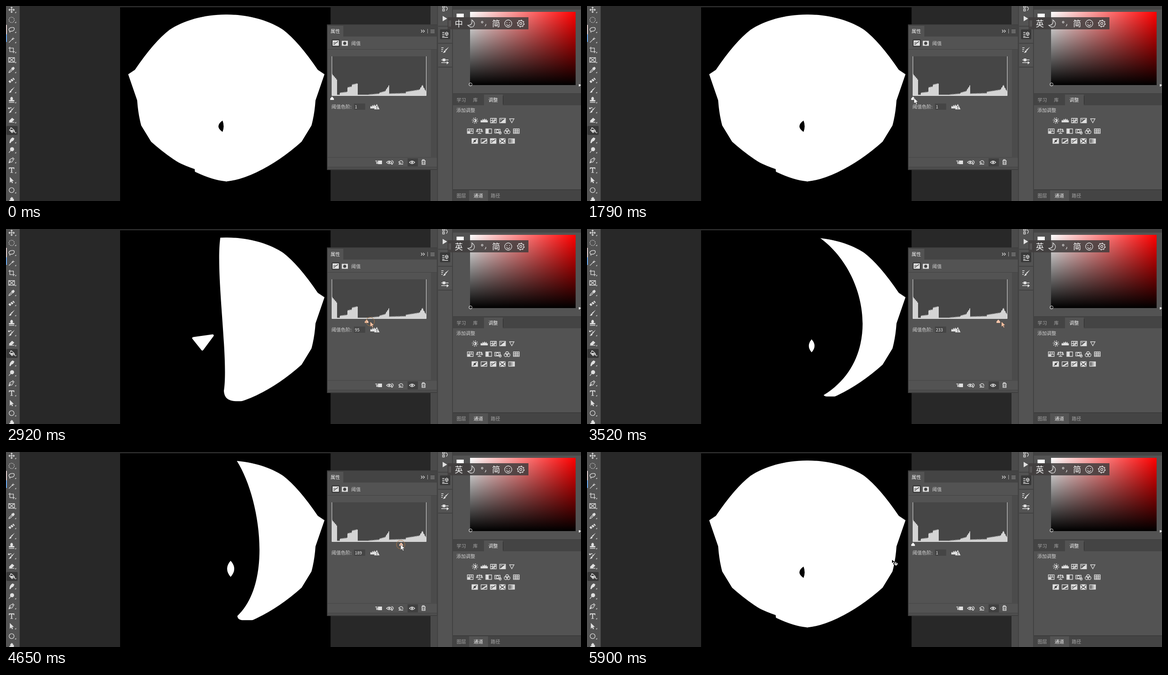
An HTML page that plays this animation: 1280x434 px, repeating every 6760 ms.

```html
<!DOCTYPE html>
<html lang="zh-CN">
<head>
<meta charset="utf-8">
<title>阈值</title>
<style>
  html, body { margin: 0; width: 100%; height: 100%; overflow: hidden; background: #282828; }
  svg { display: block; width: 100vw; height: 100vh; }
  text { font-family: "Noto Sans CJK SC", "Noto Sans CJK", "Noto Sans", sans-serif; font-size: 10.5px; fill: #d0d0d0; }
  .dim { fill: #a5a5a5; }
  .on { fill: #f2f2f2; }
  .ime { font-size: 18px; fill: #f4f4f4; text-anchor: middle; }
  .line { fill: none; stroke: #e0e0e0; stroke-width: 1.3; }
  .solid { fill: #e0e0e0; stroke: none; }
  .cut { fill: none; stroke: #484848; stroke-width: 1.4; }
</style>
</head>
<body>
<svg viewBox="0 0 1280 434" preserveAspectRatio="none">
  <defs>
    <linearGradient id="hue"><stop stop-color="#fff"/><stop offset="1" stop-color="#f00"/></linearGradient>
    <linearGradient id="shade" x2="0" y2="1"><stop stop-color="#000" stop-opacity="0"/><stop offset="1"/></linearGradient>
    <linearGradient id="ramp"><stop stop-color="#555"/><stop offset="1" stop-color="#eee"/></linearGradient>
    <clipPath id="face">
      <path id="half" d="M489 19H490C540 19 585 32 617 53Q652 80 694 142L709 152L689 210Q687 240 680 266L658 302Q610 345 558 370Q520 388 490 390.500H489z"/>
      <use href="#half" transform="matrix(-1 0 0 1 981 0)"/>
    </clipPath>
    <path id="bars" class="solid" d="M-8 4V0l2-2 1 3 2-5 2 3 2-4 2 4 2-3 1 4 2-1v5z"/>
    <g id="eye"><path class="line" d="M-6 0Q0-6 6 0Q0 6-6 0z"/><circle class="solid" r="2"/></g>
  </defs>

  <rect width="1280" height="434" fill="#282828"/>
  <rect x="254" y="3" width="468.500" height="431"/>

  <g clip-path="url(#face)"><path id="lit" fill="#fff"/></g>
  <path id="nose"/>
  <path id="cheek" fill="#fff" stroke="#fff" stroke-width="5" stroke-linejoin="round" d="M417 243L460 237L437 268z"/>
  <path id="glint" fill="#fff"/>

  <!-- tool column -->
  <rect width="30" height="434" fill="#535353"/>
  <path d="M30.500 0V434" stroke="#3a3a3a"/>
  <path d="M1 42V63" stroke="#dccaca" stroke-width="2"/>
  <path d="M1 63V80" stroke="#6aaaf0" stroke-width="2"/>
  <rect x="1" y="267" width="25" height="20" rx="2" fill="#383838"/>
  <g id="tools"></g>

  <!-- dock -->
  <rect x="945" width="335" height="434" fill="#535353"/>
  <rect x="945" width="15" height="434" fill="#4b4b4b"/>
  <path d="M960.500 0V434M994 0V434M962 45H993M962 83H993M962 136H993" stroke="#424242" stroke-width="2"/>
  <rect x="966" y="52" width="23" height="22" rx="2" fill="#393939"/>
  <g id="dock"></g>

  <!-- colour panel -->
  <rect x="995" width="285" height="8" fill="#444"/>
  <rect x="1003" y="17" width="16" height="8" fill="#fff"/>
  <rect x="1033" y="13" width="235" height="163" fill="url(#hue)"/>
  <rect x="1033" y="13" width="235" height="163" fill="url(#shade)"/>
  <circle cx="1034" cy="174.500" r="3.500" fill="none" stroke="#e8e8e8"/>
  <path class="solid" d="M1275 174h2l3 2-3 3h-2z"/>

  <!-- adjustments and layer tabs -->
  <path d="M995 195.500H1280M995 409H1280" stroke="#3c3c3c" stroke-width="2"/>
  <path d="M995 197H1280V221H995zM995 410H1280V434H995z" fill="#444"/>
  <path d="M1064 197H1106V222H1064zM1031 410H1073V434H1031z" fill="#535353"/>
  <path d="M1106.500 200V219" stroke="#2c2c2c"/>
  <text class="dim" x="1003" y="212.500">学习</text><text class="dim" x="1039.500" y="212.500">库</text><text class="on" x="1074" y="212.500">调整</text>
  <text x="1002.500" y="236">添加调整</text>
  <text class="dim" x="1003" y="426">图层</text><text class="on" x="1041" y="426">通道</text><text class="dim" x="1079" y="426">路径</text>
  <g id="adjust"></g>

  <!-- input method bar -->
  <rect x="983" y="25" width="180" height="27" fill="#403d3d" fill-opacity=".86"/>
  <path d="M986.500 32V46M989.500 32V46" stroke="#777"/>
  <text class="ime" id="lang" x="1008" y="46"></text>
  <path class="line" d="M1037 31Q1047 38 1040 46Q1034 49 1028 43Q1039 43 1037 31z"/>
  <circle class="line" cx="1060" cy="36" r="1.800"/><path class="line" d="M1068 40q1 3-2 5"/>
  <text class="ime" x="1091" y="46">简</text>
  <g class="line" transform="translate(1118 39)"><circle r="8"/><path d="M-4 2Q0 7 4 2M-3-3v2M3-3v2"/></g>
  <g class="line" transform="translate(1146 39)"><circle r="6.500"/><circle r="2.500"/><circle r="7.800" pathLength="16" stroke-dasharray="1"/></g>

  <!-- properties panel -->
  <rect x="714.500" y="41" width="246" height="324" fill="#404040"/>
  <rect x="716" y="43" width="243" height="25" fill="#444"/>
  <path d="M716 44H751V69H716zM716 68H959V358H716z" fill="#535353"/>
  <rect x="946" y="97" width="13" height="239" fill="#4b4b4b"/>
  <path d="M716 96.500H959M716 337H959" stroke="#444"/>
  <rect x="716" y="359" width="243" height="4" fill="#4e4e4e"/>
  <text class="on" x="722.500" y="59.500">属性</text>
  <path class="line" d="M924 53l3 3-3 3M928.500 53l3 3-3 3"/>
  <path d="M938.500 51V61M945 53.500h9M945 56.500h9M945 59.500h9" stroke="#aaa"/>
  <rect x="725" y="74" width="18" height="17" rx="2" fill="#383838"/>
  <rect class="solid" x="747.500" y="77.500" width="13.500" height="11"/><circle cx="754" cy="83" r="3.500" fill="#444"/>
  <text x="768.500" y="86.500">阈值</text>

  <rect x="725" y="112" width="210" height="87" fill="#464646"/>
  <path id="histogram" fill="#d4d4d4"/>
  <path d="M725.500 112V199.500H935.500V112" fill="none" stroke="#dedede"/>
  <path id="slider" d="M0-5L4.500 0V3.500H-4.500V0z" stroke="#444" stroke-width=".7"/>
  <text x="724.500" y="227.500">阈值色阶:</text>
  <rect x="774.500" y="217" width="25" height="14" fill="#454545"/>
  <text class="on" id="value" x="776.500" y="228" style="font-size:9.500px"></text>
  <use href="#bars" x="819" y="224"/>
  <path class="solid" d="M825.500 218l6 12h-12z"/><path class="cut" d="M825.500 222v4M825.500 227v2"/>
  <rect x="894" y="339" width="23" height="18" fill="#404040"/>
  <g id="actions"></g>

  <!-- pointers -->
  <circle id="ring" r="9.500" fill="none" stroke="#b07a45"/>
  <path id="resize" d="M-8 0l4-4v2.500h8V-4l4 4-4 4V1.500h-8V4z" fill="#fff" stroke="#222" stroke-width=".8"/>
  <path id="arrow" d="M0 0V12L3 9.500 5 14 7 13 5 8.500H9z" stroke="#333" stroke-width=".6"/>
  <g id="bucket"><path d="M-8-8v7l5-3z"/><path d="M-5 1L0-5 6 1 1 6zM-3 1V-3Q0-8 1-3V1M6 1v5" fill="#ddd" stroke="#111" stroke-width="1.300"/></g>
</svg>

<script>
const LOOP = 6760, STEP = 66.4;
const $ = id => document.getElementById(id);
const clamp = (v, lo, hi) => Math.min(hi, Math.max(lo, v));
const mix = (a, b, f) => Array.isArray(a) ? a.map((v, i) => mix(v, b[i], f)) : a + (b - a) * f;

// keys: [position, value] pairs, value a number or a list
function track(keys, at) {
  const next = keys.findIndex(([p]) => p >= at);
  if (next < 0) return keys[keys.length - 1][1];
  if (!next) return keys[0][1];
  const [p, a] = keys[next - 1], [q, b] = keys[next];
  return mix(a, b, (at - p) / (q - p));
}

// icons
const line = d => `<path class="line" d="${d}"/>`;
const solid = d => `<path class="solid" d="${d}"/>`;
const cut = d => `<path class="cut" d="${d}"/>`;
const ring = (r, x = 0, y = 0) => `<circle class="line" r="${r}" cx="${x}" cy="${y}"/>`;
const dashed = (r, n) => `<circle class="line" r="${r}" pathLength="${2 * n}" stroke-dasharray="1"/>`;
const use = id => `<use href="#${id}"/>`;
const place = (icon, x, y) => `<g transform="translate(${x} ${y})">${icon}</g>`;
const spread = (icons, x, y, dx, dy) => icons.map((icon, i) => place(icon, x + i * dx, y + i * dy)).join('');

const frame = line('M-6.5-5h13v10h-13z');
const block = solid('M-7-6H7V6H-7z');
const threshold = block + cut('M-5 3l3-1 2-3h2l3-3M-5 0l3-2');
const brush = solid('M7-7L0 2-2 0zM-2 1l2 2Q-2 7-7 6Q-4 5-4 2z');
const can = line('M-5 0L0-5 6 1 1 6zM-2-3V-6') + solid('M-4 0H5L1 5zM6 1q3 4 0 5q-2-1 0-5z');
const marker = solid('M10 4v3h-3z');

$('tools').innerHTML = spread([
  line('M-6 0H6M0-6V6') + solid('M-7 0l3-3v6zM7 0l-3-3v6zM0-7l3 3h-6zM0 7l3-3h-6z'),
  dashed(6, 10),
  line('M-4 3Q-9-2-2-5Q7-7 6-1Q4 4-3 3q-3 1 0 3'),
  line('M-6 6L1-1') + solid('M0-2l2 2 2-2-2-2zM3-7l1 3 3 1-3 1-1 3V-3z'),
  line('M-7-4H4V7M-4-7V4H7'),
  frame + line('M-6-5L6 5M6-5L-6 5'),
  line('M-6 6l1-3 5-5 2 2-5 5z') + solid('M-1-4l5 5 3-5-3-3z'),
  solid('M-7 3L4-5l3 4L-4 7z') + cut('M-3 0l4 5M1-3l4 4'),
  brush,
  solid('M-2-6Q0-8 2-6Q4-3 2 0H6V3H-6V0H-2Q-4-3-2-6zM-6 4.500H6V6H-6z'),
  brush + line('M-7-3q4-4 7-1M-7-6v3h3'),
  solid('M-6 2L1-5 6-1 0 5H-4z') + line('M-6 5H6'),
  can,
  solid('M-5 6Q-4-3 2-6L6-4Q5 2 0 3L-3 7z'),
  '<circle class="solid" cx="1" cy="-2" r="4.500"/>' + line('M-2 1L-6 6'),
  line('M-6 6l2-7 5-3 3 3-3 5zM-6 6l5-5M2-6l4 4'),
  solid('M-6-6H6V-2H5L4-4H1V5H3V6H-3V5H-1V-4H-4L-5-2H-6z'),
  solid('M-4-7L5 2H1L3 6 1 7-1 3-4 6z'),
  ring(5.5),
  solid('M-5 4V-1l2 1v-5h2v4-6h2v6-5h2v6-3h2V5z')
].map(icon => icon + marker), 12.5, 8.5, 0, 22.3);

$('adjust').innerHTML = spread([
  ring(3) + dashed(6, 8) + solid('M0-3a3 3 0 0 1 0 6z'),
  use('bars'),
  frame + line('M-2-5V5M2-5V5M-6 0H6M-5 5Q2 3 6-5'),
  frame + solid('M-6 5L6-5V5z') + line('M-5-2h4'),
  line('M-5-4H5L0 5z')
], 1044, 255, 20.5, 0) + spread([
  frame + line('M-6 0H6M-2-5V0M2-5V0') + solid('M-6 1H0V5H-6z'),
  line('M0-6V5M-5-4H5M-4 5H4M-5-4l-2 5h4zM5-4l-2 5h4z'),
  frame + solid('M-6-5H0V5H-6z'),
  ring(3, -1) + ring(2.5, 5, 4) + line('M-7-4H5V4H-7z'),
  ring(3.5, 0, -2) + ring(3.5, -3, 2) + ring(3.5, 3, 2),
  frame + line('M-2-5V5M2-5V5M-6-1.500H6M-6 2H6')
], 1033.5, 278.5, 20.5, 0) + spread([
  block + cut('M-4 4L4-4') + '<circle r="2.500" fill="#484848"/>',
  frame + solid('M-6 4L6-4V0L-3 5z'),
  threshold,
  block + cut('M-6-5L0 1 6-5M-6 5L0 0 6 5'),
  '<rect class="line" x="-6.500" y="-5" width="13" height="10" style="fill:url(#ramp)"/>'
], 1043.5, 300.5, 20.5, 0);

$('dock').innerHTML = place(line('M-5-5h4v4h-4zM-5 2h4v4h-4zM1-3q6 0 4 6l-2 2'), 977, 5)
  + place(solid('M-5-6L5 0-5 6z'), 977, 28)
  + place(line('M-6-4h5M-6 0h5M-6 4h5M1-3l3-2 3 2v4l-3 2-3-2zM1-3l3 2 3-2M4-1v4') + solid('M-6 6H7v1.500H-6z'), 977, 63)
  + place(line('M-8-5h5M-8-1h4M-8 3h3') + place(brush, 2, 0), 977, 98)
  + place(line('M-8-3H8M-8 3H8') + solid('M-5-6h6v6h-6zM4 0l5 3-5 4z'), 977, 123);

$('actions').innerHTML = place(threshold, 734, 82.5) + spread([
  solid('M-1-4H8V4H-1z') + line('M-7-3h4v5M-5 0l2 3 2-3'),
  place(use('eye'), -1, 0) + line('M4-4q5 1 4 5l-3 3M4 1v3h3'),
  line('M-3 2a4 4 0 1 1 7 0M-5 4h10M-5-2l2 4 4-1'),
  use('eye'),
  line('M-4-3.500h9M-2-4v-2h4v2M-3-3v7.500h7V-3M-1-1v4M2-1v4')
], 829, 348, 25, 0);

// histogram: plateaus and slopes [from, to, height, height]
const humps = [[0, 12, 48, 34], [18, 35, 6, 8], [35, 45, 18, 20], [45, 58, 24, 27], [83, 106, 2, 4], [106, 120, 6, 10],
  [120, 128, 12, 24], [128, 165, 4, 5], [165, 196, 8, 13], [196, 203, 15, 25], [203, 210, 20, 8]];
const barHeight = x => {
  const hump = humps.find(([from, to]) => x >= from && x < to);
  return hump ? mix(hump[2], hump[3], (x - hump[0]) / (hump[1] - hump[0])) + Math.sin(x * 2.3) : 1.5;
};
$('histogram').setAttribute('d', 'M725 199' +
  Array.from({ length: 210 }, (_, x) => `V${(199 - barHeight(x)).toFixed(1)}h1`).join('') + 'V199z');

// terminator of the shadow: level, then [top, bulge, bottom] x
const shadowEdge = [[1, [420, 200, 420]], [95, [477, 481, 485]], [189, [514, 580, 515]], [233, [519, 643, 527]], [255, [538, 678, 540]]];

function litPath(level) {
  const [top, bulge, bottom] = track(shadowEdge, level);
  const round = (255 - level) / 7;
  const floor = 372.5 + (255 - level) ** 2 / 2400;
  return `M740 0H${top}V20C${bulge - 15} 100 ${bulge + 15} 290 ${bottom} ${floor - round}`
    + `Q${bottom + 1} ${floor} ${bottom + round + 4} ${floor}H740z`;
}

const lens = (x, y, h, left, right) =>
  `M${x} ${y - h}Q${x + 2 * right} ${y} ${x} ${y + h}Q${x - 2 * left} ${y} ${x} ${y - h}z`;

// motion, keyed by step
const levels = [[30, 1], [44, 95], [53, 233], [57, 250], [61, 250], [70, 189], [83, 1]];
const approach = [[3, [688, 425]], [8, [701, 292]], [11, [718, 203]], [27, [728, 205]]];
const sliderX = level => 725 + level * .818;

function pointerAt(k, level) {
  if (k < 30) return track(approach, k);
  const drag = [sliderX(level) + track([[30, 3], [44, 8], [61, 6], [70, -1]], k), 206];
  return mix(drag, [687, 248], clamp((k - 83) / 5, 0, 1));
}

const move = (el, x, y, scale = 1) => el.setAttribute('transform', `translate(${x} ${y}) scale(${scale})`);
const show = (el, visible) => el.setAttribute('visibility', visible ? 'visible' : 'hidden');

function draw(ms) {
  const k = Math.floor((ms % LOOP + 10) / STEP);
  const level = Math.round(track(levels, k));
  $('lit').setAttribute('d', litPath(level));

  $('nose').setAttribute('d', lens(482, 267.5, 12.5 + level / 8, 9 + level / 10, 2.5));
  show($('nose'), level < 60);
  const size = clamp((140 - level) / 45, 0, 1.2);
  move($('cheek'), 438 * (1 - size), 250 * (1 - size), size);
  show($('cheek'), level > 1 && size > 0);
  const half = 18 - (level - 189) * .08;
  $('glint').setAttribute('d', lens(500, 260, half, half * .43, half * .45));
  show($('glint'), level >= 95);

  $('value').textContent = level;
  $('lang').textContent = k < 18 ? '中' : '英';
  move($('slider'), sliderX(level), 206);
  $('slider').setAttribute('fill', k >= 40 && k < 83 ? '#f6c6ab' : '#f4f4f4');

  const [x, y] = pointerAt(k, level);
  const mode = k < 3 ? '' : k < 14 ? 'resize' : k < 86 ? 'arrow' : 'bucket';
  for (const id of ['resize', 'arrow', 'bucket']) {
    show($(id), id === mode);
    move($(id), x, y);
  }
  $('arrow').setAttribute('fill', k >= 40 && k < 62 ? '#f6c0a0' : '#fff');
  move($('ring'), x, y);
  show($('ring'), (k > 41 && k < 48) || (k > 65 && k < 80));
}

function tick() {
  draw(performance.now());
  requestAnimationFrame(tick);
}
tick();
</script>
</body>
</html>
```
